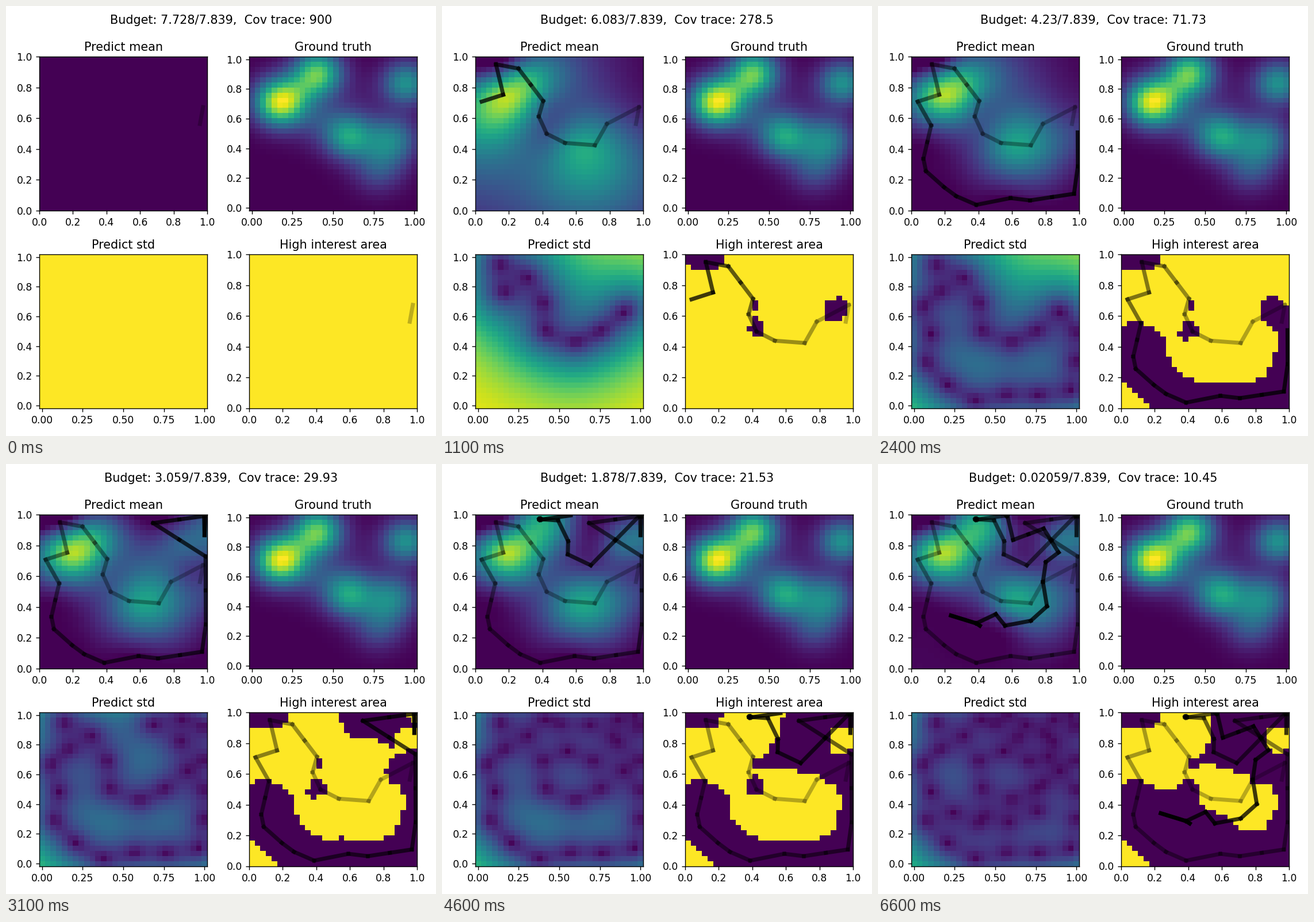
These frames come from a looping animation (748 px wide and 748 px high, 6.7 s). A matplotlib script:

```python
import numpy as np
import matplotlib.pyplot as plt
from matplotlib.animation import FuncAnimation

SIZE, INCHES, STEP_MS = 748, 6, 100
CELLS, SPACING = 30, 0.2
LENGTH_SCALE, THRESHOLD = 0.45, 0.4
BUDGET, LEFT_OVER = 7.839, 0.02059

# --- route -----------------------------------------------------------------
route = [np.array([.957, .5625])]


def go(*points, steps=1):
    """Walk straight to each point, in equal steps."""
    for p in points:
        route.extend(np.linspace(route[-1], p, steps + 1)[1:])


def hover(n, r=0.005):
    """Tiny hops around the current spot."""
    a = 2.4 * np.arange(n)
    route.extend(route[-1] + r * np.column_stack([np.cos(a), np.sin(a)]))


# across the middle, up to the left hill and down the left side
go((.975, .672), (.784, .563), (.712, .424), (.534, .439), (.425, .499),
   (.378, .611), (.404, .712))
go((.257, .923), steps=2)
go((.123, .951), (.166, .753), (.038, .708), (.118, .553))
go((.072, .336), steps=2)
# along the bottom and up the right side
go((.087, .256), (.195, .151), (.267, .093), (.387, .036), (.591, .080),
   (.707, .065))
go((.969, .108), steps=2)
go((.992, .286))
go((.990, .729), (.678, .946), (.990, .993), steps=2)
go((.984, .867), (.981, .990))
hover(2)
# zigzag through the top
go((.688, .671), steps=2)
go((.551, .742), (.553, .828), (.493, .963), (.385, .971))
hover(6)
go((.568, .996))
hover(4)
go((.606, .836))
go((.788, .910), (.877, .755), steps=2)
# down to the lower middle
go((.801, .692), (.784, .563), (.808, .404), (.712, .310), (.558, .278),
   (.503, .353), (.387, .293), (.236, .344), (.387, .293), (.408, .278),
   (.388, .292))

route = np.array(route)
frames = len(route) - 1
travelled = np.r_[0, np.cumsum(np.hypot(*np.diff(route, axis=0).T))]
travelled *= (BUDGET - LEFT_OVER) / travelled[-1]
left = BUDGET - travelled

# --- field and its regression ----------------------------------------------
HILLS = [  # x, y, height, sigma
    (.175, .712, .96, .11), (.405, .905, .74, .105), (.30, .80, .10, .08),
    (.60, .48, .55, .105), (.86, .46, .42, .11), (.78, .27, .25, .11),
    (.95, .84, .50, .10), (.42, .60, .17, .12), (.68, .75, .05, .12)]


def field(p):
    return sum(h * np.exp(-((p[:, 0] - x) ** 2 + (p[:, 1] - y) ** 2) / (2 * s * s))
               for x, y, h, s in HILLS)


def matern(a, b):
    r = np.sqrt(3) / LENGTH_SCALE * np.hypot(a[:, None, 0] - b[None, :, 0],
                                             a[:, None, 1] - b[None, :, 1])
    return (1 + r) * np.exp(-r)


axis = np.linspace(0, 1, CELLS)
grid = np.stack(np.meshgrid(axis, axis), -1).reshape(-1, 2)
marks = np.arange(SPACING, travelled[-1], SPACING)
samples = np.column_stack([np.interp(marks, travelled, c) for c in route.T])
values = field(samples)


def predict(n):
    """Mean, deviation, high interest mask and its variance from n samples."""
    if n == 0:
        mean, var = np.zeros(len(grid)), np.ones(len(grid))
    else:
        pts = samples[:n]
        cross = matern(grid, pts)
        weights = np.linalg.solve(matern(pts, pts) + 1e-6 * np.eye(n), cross.T)
        mean = weights.T @ values[:n]
        var = np.clip(1 - np.sum(cross.T * weights, axis=0), 0, 1)
    std = np.sqrt(var)
    high = mean + std >= THRESHOLD
    return mean, std, high.astype(float), var[high].sum()


models = [predict(n) for n in range(len(marks) + 1)]
counts = np.searchsorted(marks, travelled[1:])

# --- figure ----------------------------------------------------------------
plt.rcParams["font.family"] = "DejaVu Sans"
fig = plt.figure(figsize=(INCHES, INCHES), dpi=SIZE / INCHES, facecolor="white")
heading = fig.suptitle("", fontsize=12)
half = 0.5 / (CELLS - 1)


def panel(x, y, title, unit):
    """Heat map whose cells fill the unit square or are centred on the grid."""
    w, h = 292, 267.2
    lo, hi = (0, 1) if unit else (-half, 1 + half)
    edges = np.linspace(lo, hi, CELLS + 1)
    ax = fig.add_axes([x / SIZE, 1 - (y + h) / SIZE, w / SIZE, h / SIZE])
    ax.set_title(title, fontsize=12)
    mesh = ax.pcolormesh(edges, edges, np.zeros((CELLS, CELLS)),
                         cmap="viridis", vmin=0, vmax=1)
    ax.set_xticks(np.linspace(0, 1, 6 if unit else 5))
    ax.set_yticks(np.linspace(0, 1, 6))
    ax.set(xlim=(lo, hi), ylim=(lo, hi))
    return ax, mesh


def trail(ax):
    return [ax.plot(*route[i:i + 2].T, color="black", lw=4, zorder=5,
                    scalex=False, scaley=False)[0]
            for i in range(frames)]


mean_ax, mean_mesh = panel(58, 88.3, "Predict mean", True)
_, truth_mesh = panel(423, 88.3, "Ground truth", False)
_, std_mesh = panel(58, 432.3, "Predict std", False)
high_ax, high_mesh = panel(423, 432.3, "High interest area", True)
truth_mesh.set_array(field(grid).reshape(CELLS, CELLS))
trails = [trail(mean_ax), trail(high_ax)]


def draw(k):
    *maps, trace = models[counts[k]]
    for mesh, data in zip((mean_mesh, std_mesh, high_mesh), maps):
        mesh.set_array(data.reshape(CELLS, CELLS))
    for lines in trails:
        for i, line in enumerate(lines):
            line.set_visible(i <= k)
            line.set_alpha(min(1, 0.25 + 0.6 * i / (k + 2)))
    heading.set_text(f"Budget: {left[k + 1]:.4g}/{BUDGET:.4g},  "
                     f"Cov trace: {trace:.4g}")
    return []


anim = FuncAnimation(fig, draw, frames=frames, interval=STEP_MS,
                     repeat=True, repeat_delay=0)
plt.show()
```
